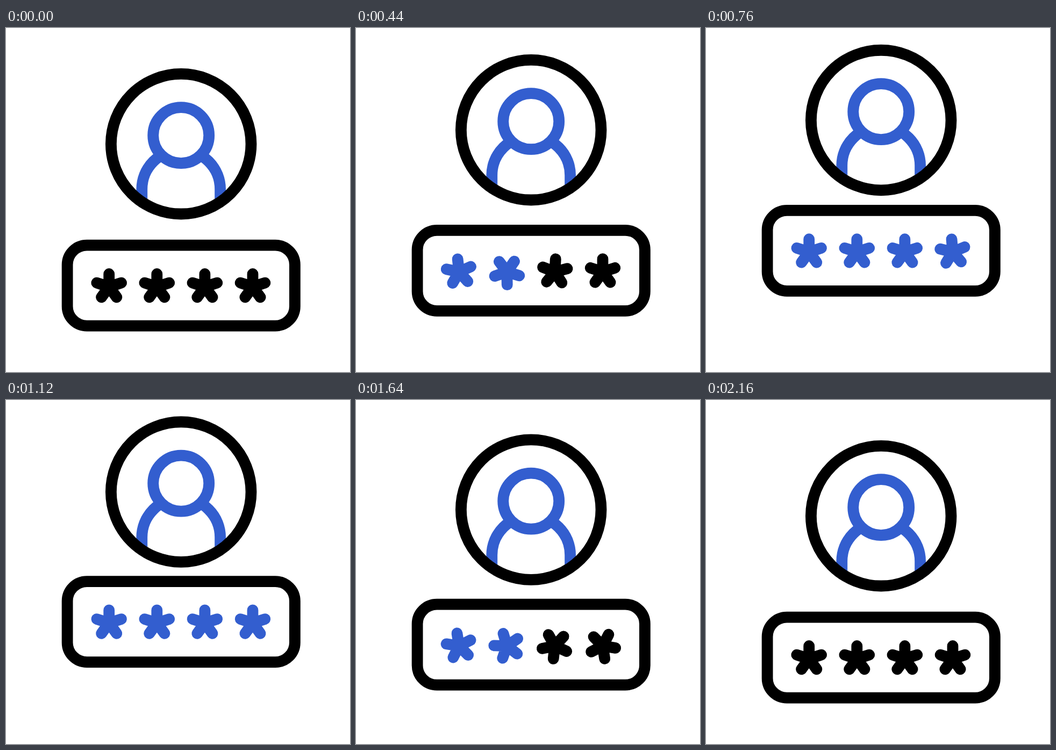
Write an HTML page that moves like this. It is 640 by 640 pixels and loops after 2.48 s.

```html
<!DOCTYPE html>
<html lang="en">
<head>
<meta charset="utf-8">
<title>Login</title>
<style>
  html, body { margin: 0; width: 100%; height: 100%; overflow: hidden; background: #fff; }
  svg { display: block; width: 100%; height: 100%; }
</style>
</head>
<body>
<svg viewBox="0 0 640 640" fill="none" stroke="#000" stroke-width="20.8">
  <g id="user">
    <g stroke="#335ecf">
      <path d="M252.8 323V300a72.9 72.9 0 0 1 145.8 0V323"/>
      <circle cx="325.7" cy="199.7" r="52" fill="#fff"/>
    </g>
    <circle cx="325.7" cy="215.7" r="130.3"/>
  </g>
  <g id="field">
    <rect x="114.1" y="404.1" width="423.3" height="150" rx="36.4"/>
  </g>
</svg>
<script>
const LOOP = 2480, STEP = 40;
const BLUE = '#335ecf';
const user = document.getElementById('user');
const field = document.getElementById('field');

// Progress from start to end along cubic-bezier(x1, 0, x2, 1)
function ease(t, start, end, x1, x2) {
  const x = (t - start) / (end - start);
  if (x <= 0) return 0;
  if (x >= 1) return 1;
  let lo = 0, hi = 1;
  for (let i = 0; i < 24; i++) {
    const s = (lo + hi) / 2, r = 1 - s;
    if (3 * x1 * s * r * r + 3 * x2 * s * s * r + s * s * s < x) lo = s;
    else hi = s;
  }
  return lo * lo * (3 - 2 * lo);
}

const stars = [0, 1, 2, 3].map(i => {
  const star = document.createElementNS('http://www.w3.org/2000/svg', 'path');
  let d = '';
  for (let k = 0; k < 5; k++) {
    const a = k * Math.PI * 0.4;
    d += `M0 0L${24 * Math.sin(a)} ${-24 * Math.cos(a)}`;
  }
  star.setAttribute('d', d);
  star.setAttribute('stroke-linecap', 'round');
  field.append(star);
  return star;
});

function shift(el, y) {
  el.setAttribute('transform', `translate(0 ${y})`);
}

function draw(t) {
  shift(user, -44.7 * (ease(t, 80, 880, 0.66, 0.15) - ease(t, 1080, 2160, 0.6, 0.2)));
  shift(field, -66.6 * (ease(t, 80, 920, 0.62, 0.26) - ease(t, 1080, 2160, 0.655, 0.27)));
  stars.forEach((star, i) => {
    const on = 148 + 102 * i;
    const off = 1337 + 39 * (3 - i);
    const up = ease(t, on, on + 432, 0.65, 0.2);
    const down = ease(t, off, off + 630, 0.65, 0.2);
    star.setAttribute('transform', `translate(${191.7 + 89.1 * i} 481.5) rotate(${72 * (up - down)})`);
    star.setAttribute('stroke', up > 0.4 && down < 0.4 ? BLUE : '#000');
  });
}

const begin = performance.now();
function tick() {
  const t = (performance.now() - begin) % LOOP;
  draw(Math.floor(t / STEP) * STEP);
  requestAnimationFrame(tick);
}
tick();
</script>
</body>
</html>
```
